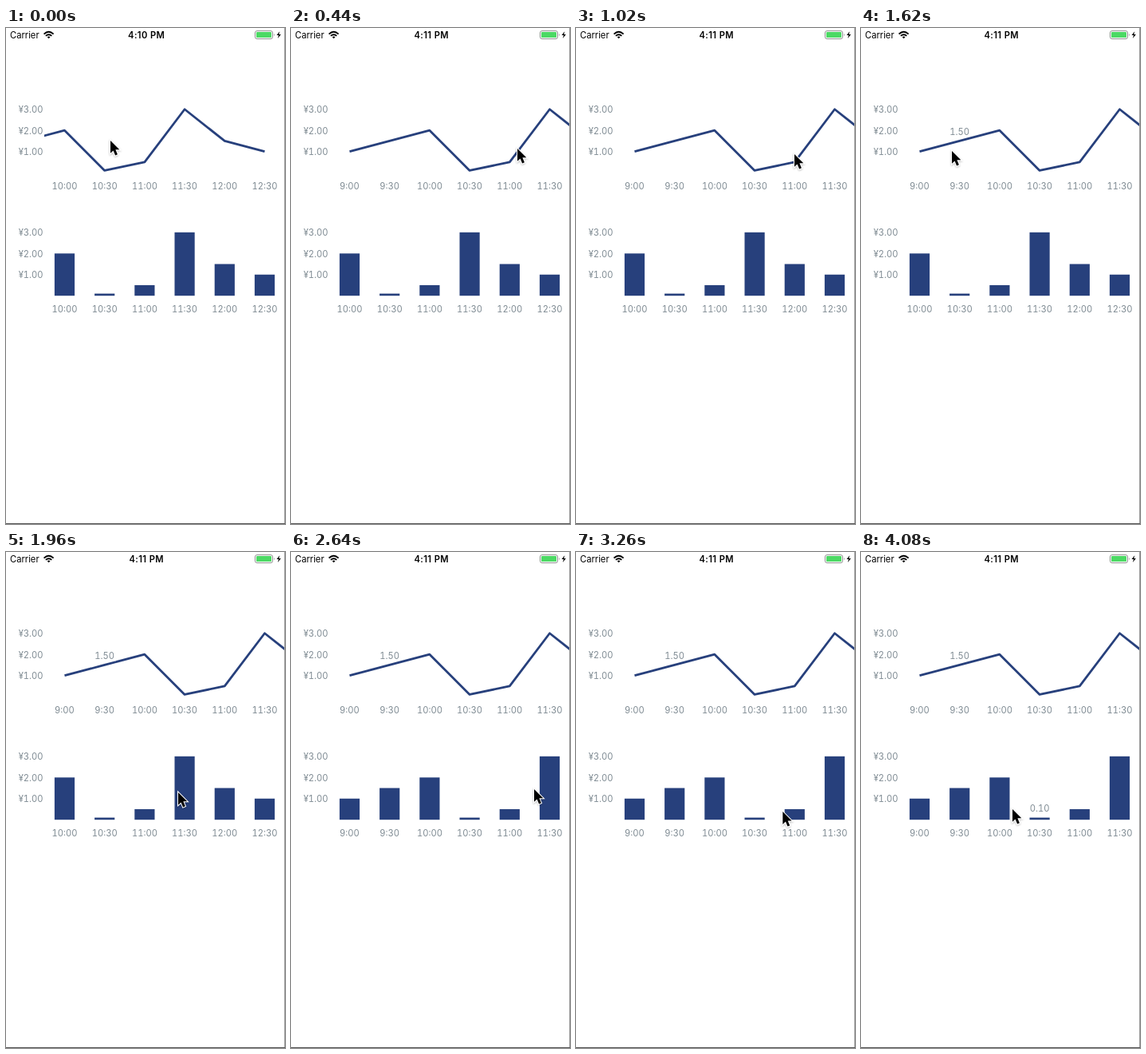
Recreate the animation shown at these times as an HTML page. Size 350 by 621 pixels, loop 4100 ms.

```html
<!DOCTYPE html>
<html lang="en">
<head>
<meta charset="utf-8">
<style>
html, body { margin: 0; width: 100%; height: 100%; overflow: hidden; background: #fff; }
svg { display: block; width: 350px; height: 621px; }
text { font-family: Inter, Roboto, sans-serif; font-size: 11.2px; }
.axis { fill: #7f8b93; font-variant-numeric: tabular-nums; }
.mid { text-anchor: middle; }
.end { text-anchor: end; }
#clock { font-weight: 600; letter-spacing: .4px; }
</style>
</head>
<body>
<svg viewBox="0 0 350 621">
  <defs>
    <clipPath id="plot"><rect x="48" y="60" width="302" height="320"/></clipPath>
    <filter id="shadow" x="-50%" y="-50%" width="200%" height="200%">
      <feDropShadow dx="0" dy="1" stdDeviation="1" flood-color="#000" flood-opacity=".3"/>
    </filter>
  </defs>
  <rect width="350" height="621" fill="#fff"/>

  <text x="5" y="13">Carrier</text>
  <g fill="none" stroke="#000" stroke-width="1.9">
    <path d="M47.6 7.6Q53.6 1.9 59.6 7.6"/>
    <path d="M49.9 9.9Q53.6 6.5 57.3 9.9"/>
  </g>
  <path d="M51.7 11.2Q53.6 9.6 55.5 11.2L53.6 13.2Z"/>
  <text id="clock" class="mid" x="176.2" y="12.7"></text>
  <rect x="312.5" y="3.6" width="22" height="10" rx="2.4" fill="#fff" stroke="#8f8f8f"/>
  <rect x="314" y="5.1" width="19" height="7" rx="1.2" fill="#4cd964"/>
  <path d="M336 6.8Q337.6 8.6 336 10.4Z" fill="#8f8f8f"/>
  <path d="M343.3 4.2L339.6 9.1H342L340.9 13L344.9 7.9H342.4Z"/>

  <g id="scales"></g>
  <g clip-path="url(#plot)">
    <g id="line"></g>
    <g id="bars"></g>
  </g>
  <path d="M349.5 0V621" stroke="#a0a0a0"/>
  <path d="M0 620.5H350" stroke="#555"/>
  <path id="cursor" d="M0 0V15.8L3.6 12.4L6.1 18.5L8.9 17.3L6.4 11.3H11.3Z"
    stroke="#fff" stroke-width="2" paint-order="stroke" filter="url(#shadow)"/>
</svg>
<script>
const LOOP = 4100, TICK = 20, MOVE = 220, SWIPE = 300;
const X0 = 73.5, STEP = 50.2, UNIT = 26.45, END = 2 * STEP;
const LINE_BASE = 181.1, BAR_BASE = 335.2, BLUE = '#27407c';
const values = [1, 1.5, 2, 0.1, 0.5, 3, 1.5, 1];
const $ = id => document.getElementById(id);

// Cursor stops: arrival time, position, chart dragged on the way
const stops = [
  [0, 131, 141],
  [260, 284, 151, 'line'], [720, 140, 150, 'line'], [960, 274, 158, 'line'],
  [1400, 114, 154], [1940, 216, 301], [2180, 155, 303],
  [2440, 305, 297, 'bars'], [2860, 142, 307, 'bars'], [3140, 290, 310, 'bars'],
  [3380, 219, 345], [4080, 190, 322]
];

const clamp = p => Math.min(1, Math.max(0, p));
const smooth = p => (p = clamp(p), p * p * (3 - 2 * p));
// Follows the finger, overshoots, then springs back
const swipe = p => smooth(p / 0.6) + 0.12 * Math.sin(Math.PI * clamp((p - 0.3) / 0.6));

function cursorAt(t) {
  let [, x, y] = stops[0];
  for (const [at, nx, ny] of stops.slice(1)) {
    const e = smooth((t - at) / MOVE + 1);
    x += (nx - x) * e;
    y += (ny - y) * e;
  }
  return [x, y];
}

// Drags alternate between revealing earlier and later hours
function scrollAt(chart, t) {
  return stops.filter(s => s[3] === chart).reduce((offset, [at], i) =>
    offset + (i % 2 ? END : -END) * swipe((t - at + MOVE) / SWIPE), END);
}

const xAt = i => X0 + STEP * i;
const label = (x, y, s, cls, id = '') =>
  `<text ${id && `id="${id}"`} class="axis ${cls}" x="${x}" y="${y}">${s}</text>`;
const hours = base => values.map((_, i) =>
  label(xAt(i), base + 21, `${9 + (i >> 1)}:${i % 2 ? '30' : '00'}`, 'mid')).join('');
const valueTag = (i, base, id) =>
  label(xAt(i), base - values[i] * UNIT - 7.4, values[i].toFixed(2), 'mid', id);

function build() {
  $('scales').innerHTML = [LINE_BASE, BAR_BASE].map(base =>
    [1, 2, 3].map(v => label(46.6, base - v * UNIT + 4.3, `¥${v}.00`, 'end')).join('')).join('');

  const points = values.map((v, i) => `${xAt(i)},${LINE_BASE - v * UNIT}`).join(' ');
  $('line').innerHTML =
    `<polyline points="${points}" fill="none" stroke="${BLUE}" stroke-width="2.8" stroke-linejoin="round"/>` +
    hours(LINE_BASE) + valueTag(1, LINE_BASE, 'lineTag');

  $('bars').innerHTML = values.map((v, i) =>
    `<rect x="${xAt(i) - 12.6}" y="${BAR_BASE - v * UNIT}" width="25.2" height="${v * UNIT}" fill="${BLUE}"/>`).join('') +
    hours(BAR_BASE) + valueTag(3, BAR_BASE, 'barTag');
}

function move(id, x, y = 0) {
  $(id).setAttribute('transform', `translate(${x.toFixed(2)} ${y.toFixed(2)})`);
}

function show(id, on) {
  $(id).setAttribute('visibility', on ? 'visible' : 'hidden');
}

function render(t) {
  $('clock').textContent = t < 200 ? '4:10 PM' : '4:11 PM';
  for (const chart of ['line', 'bars']) move(chart, -scrollAt(chart, t));
  move('cursor', ...cursorAt(t));
  show('lineTag', t >= 1620);
  show('barTag', t >= 3540);
}

build();
render(0);
const start = performance.now();
function loop() {
  const t = (performance.now() - start) % LOOP;
  render(Math.floor(t / TICK) * TICK);
  requestAnimationFrame(loop);
}
requestAnimationFrame(loop);
</script>
</body>
</html>
```
